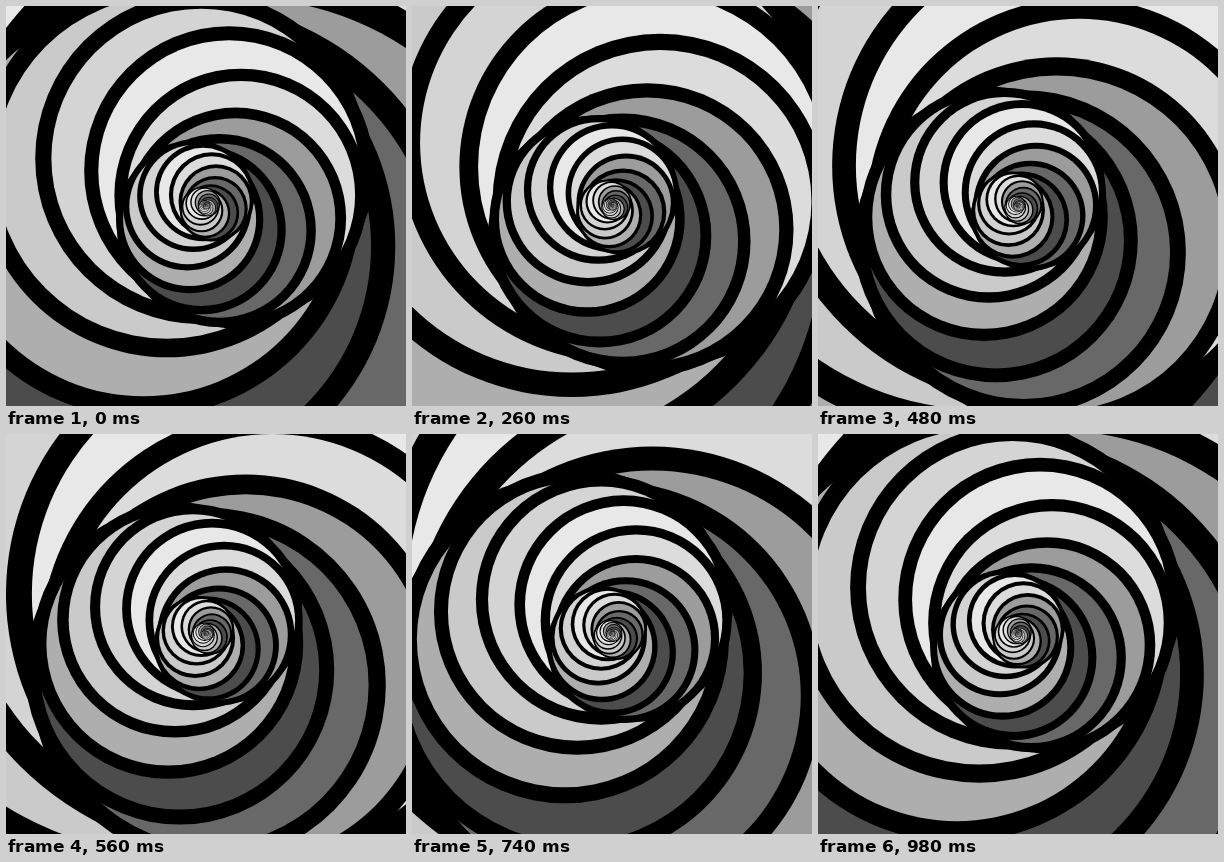
Write an HTML page with a canvas that moves like this. It is 400 px wide and 400 px high and loops after 1000 ms.

```html
<!DOCTYPE html>
<html lang="en">
<head>
<meta charset="utf-8">
<title>Spiral tunnel</title>
<style>
  html, body { margin: 0; width: 100%; height: 100%; overflow: hidden; background: #000; }
  canvas { display: block; width: 100vw; height: 100vh; }
</style>
</head>
<body>
<canvas id="stage" width="400" height="400"></canvas>
<script>
const ctx = document.getElementById('stage').getContext('2d');
const LOOP = 1000;
const SHADES = ['#d4d4d4', '#e8e8e8', '#dcdcdc', '#9c9c9c', '#686868', '#4c4c4c', '#aeaeae', '#cacaca'];
const COUNT = SHADES.length;
const ZOOM = 2.95;                          // growth per loop
const TURN = Math.PI / 4;                   // rotation per loop
const SHRINK = ZOOM ** (-1 / COUNT);        // radius ratio of neighbours
const STEP = (2 * Math.PI - TURN) / COUNT;  // angle between neighbours
const RADIUS = 149.5;
const OFFSET = 0.32;                        // centre distance / radius
const RIM = 1.108;                          // black rim radius / radius
const START = -96 * Math.PI / 180;

function disc(x, y, r, color) {
  ctx.fillStyle = color;
  ctx.beginPath();
  ctx.arc(x, y, r, 0, 2 * Math.PI);
  ctx.fill();
}

function draw(t) {
  const scale = RADIUS * ZOOM ** t;
  for (let n = -2 * COUNT; n < 7 * COUNT; n++) {
    const r = scale * SHRINK ** n;
    const a = START + n * STEP + t * TURN;
    const x = 200 + OFFSET * r * Math.cos(a);
    const y = 200 + OFFSET * r * Math.sin(a);
    disc(x, y, r * RIM, '#000');
    disc(x, y, r, SHADES[(n + 2 * COUNT) % COUNT]);
  }
}

const begin = performance.now();
function tick() {
  draw((performance.now() - begin) % LOOP / LOOP);
  requestAnimationFrame(tick);
}
tick();
</script>
</body>
</html>
```
